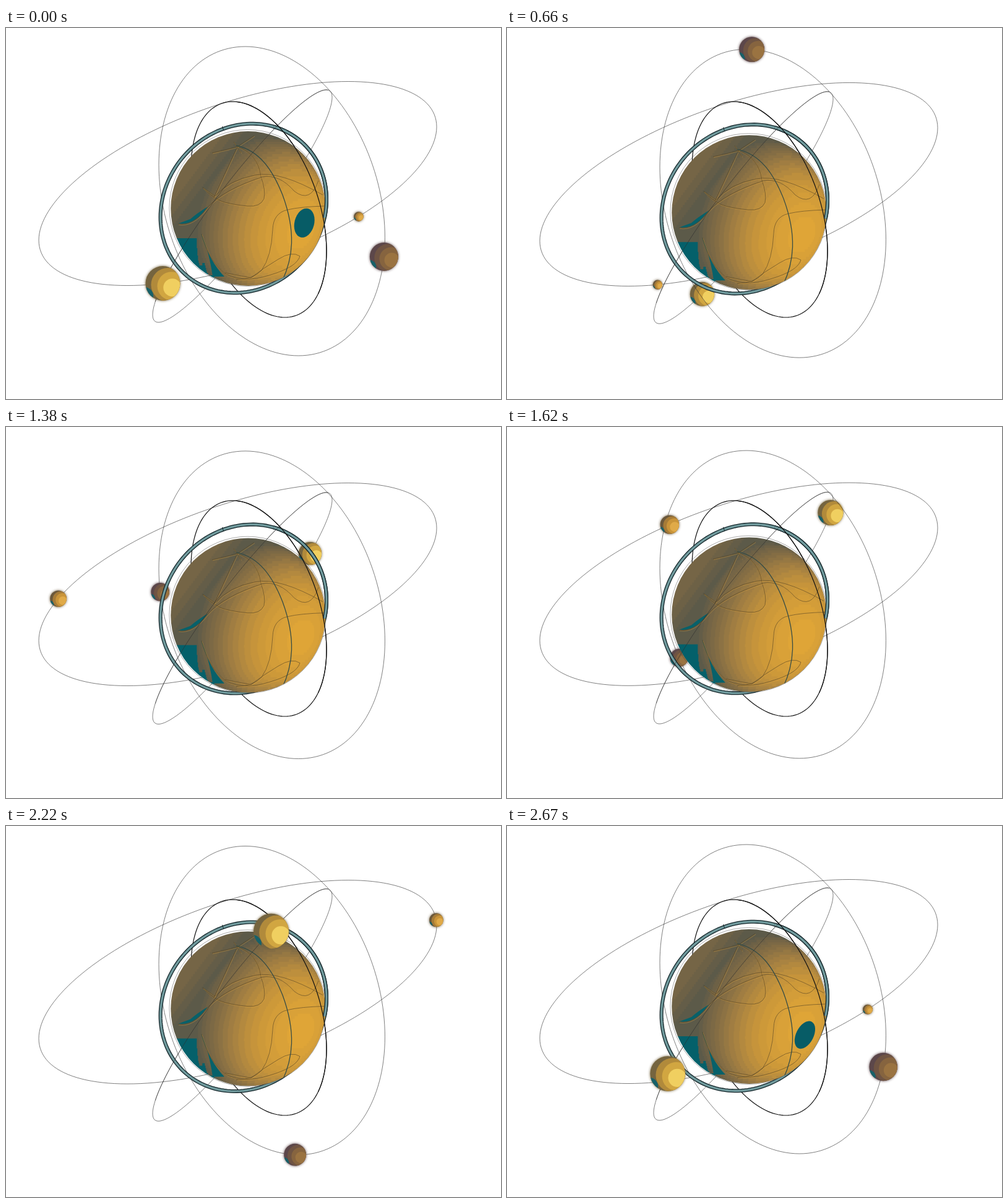
An HTML page with a canvas that plays this animation: 800x600 px, repeating every 2700 ms.

```html
<!DOCTYPE html>
<html lang="en">
<head>
<meta charset="utf-8">
<title>Planet with three moons</title>
<style>
  html, body { margin: 0; width: 100%; height: 100%; overflow: hidden; background: #fff; }
  canvas { display: block; width: 800px; height: 600px; }
</style>
</head>
<body>
<canvas id="stage" width="800" height="600"></canvas>
<script>
const ctx = document.getElementById('stage').getContext('2d');
const LOOP = 2700, STEP = 30, TAU = Math.PI * 2, RAD = Math.PI / 180;
const PLANET = { x: 391.3, y: 292, r: 125 };
const clamp = (v, lo, hi) => Math.min(hi, Math.max(lo, v));

// Ellipses by half extents; c is the slant, dy and dh follow the bob
const ORBITS = {
  wide:  { x: 374.5, y: 251.5, w: 321.5, h: 165,   c: -0.555, dy: 3,   dh: -1 },
  tall:  { x: 429.7, y: 280,   w: 182.7, h: 250,   c: 0.235,  dy: 7.7, dh: -1.2 },
  thin:  { x: 382,   y: 288,   w: 145,   h: 188,   c: -0.935, dy: 5.2, dh: -0.7 },
  dark:  { x: 408.5, y: 293.5, w: 109.5, h: 174.5, c: 0.385,  dy: 0,   dh: 0 },
  band:  { x: 383.8, y: 291.5, w: 134.2, h: 136.8, c: -0.105, dy: 2.6, dh: -0.3 }
};

// Perspective motion: k is the speed-up at the near point, reached at time `near`
const MOONS = {
  gold:   { orbit: 'wide', dir: 1,  near: 1700, start: 265.3,  k: 1.47, r: 9.7,
            tones: ['#6b583b', '#a67b37', '#c99439', '#e0aa48'] },
  brown:  { orbit: 'tall', dir: -1, near: 205,  start: -27.1,  k: 1.28, r: 18,
            tones: ['#5c474a', '#6f5443', '#86643f', '#9a7341'] },
  yellow: { orbit: 'thin', dir: -1, near: 2440, start: -108.6, k: 1.29, r: 22.2,
            tones: ['#75643f', '#b18a3b', '#d1a641', '#f0cf60'] }
};

function pointOn(o, a, bob) {
  const s = Math.sqrt(1 - o.c * o.c);
  return [o.x + o.w * Math.cos(a),
          o.y + o.dy * bob + (o.h + o.dh * bob) * (o.c * Math.cos(a) + s * Math.sin(a))];
}

function arc(o, bob, color, width, from = 0, to = TAU) {
  ctx.beginPath();
  for (let i = 0; i <= 160; i++) ctx.lineTo(...pointOn(o, from + (to - from) * i / 160, bob));
  ctx.strokeStyle = color;
  ctx.lineWidth = width;
  ctx.stroke();
}

function disc(x, y, r, color) {
  ctx.beginPath();
  ctx.arc(x, y, r, 0, TAU);
  ctx.fillStyle = color;
  ctx.fill();
}

function placeMoon(m, t, bob) {
  const phase = m.dir * TAU * (t - m.near) / LOOP;
  const a = m.start * RAD + 2 * Math.atan(m.k * Math.tan(phase / 2));
  const e = (m.k * m.k - 1) / (m.k * m.k + 1);
  const depth = Math.cos(phase);
  const [x, y] = pointOn(ORBITS[m.orbit], a, bob);
  return { x, y, r: m.r / (1 - e * depth), front: depth > 0.2, tones: m.tones };
}

function drawMoon({ x, y, r, tones }) {
  ctx.save();
  ctx.shadowColor = tones[0];
  ctx.shadowBlur = 4;
  disc(x, y, r, tones[0]);
  ctx.restore();
  ctx.save();
  ctx.beginPath();
  ctx.arc(x, y, r, 0, TAU);
  ctx.clip();
  disc(x - r * 1.05, y + r * 0.72, r * 0.5, '#176169');
  disc(x + r * 0.3, y + r * 0.08, r * 0.98, tones[1]);
  disc(x + r * 0.5, y + r * 0.15, r * 0.82, tones[2]);
  disc(x + r * 0.55, y + r * 0.24, r * 0.52, tones[3]);
  ctx.restore();
}

// Colour ramp from shadow to light
const RAMP = [[0, 84, 86, 74], [0.2, 112, 98, 70], [0.4, 138, 113, 68],
              [0.58, 168, 130, 65], [0.78, 201, 150, 58], [1, 223, 165, 55]];
function tone(b) {
  const i = clamp(RAMP.findIndex(s => s[0] >= b), 1, RAMP.length - 1);
  const lo = RAMP[i - 1], hi = RAMP[i], f = (b - lo[0]) / (hi[0] - lo[0]);
  return [1, 2, 3].map(n => lo[n] + (hi[n] - lo[n]) * f);
}

// Stepped light on the sphere, with a folded panel at the upper left
function makePlanet() {
  const size = 260, half = size / 2, R = PLANET.r;
  const cv = document.createElement('canvas');
  cv.width = cv.height = size;
  const g = cv.getContext('2d'), img = g.createImageData(size, size);
  for (let j = 0; j < size; j++) {
    for (let i = 0; i < size; i++) {
      const x = i - half, y = Math.floor((j - half) / 4) * 4;
      const u = x / R, v = y / R, z = Math.sqrt(Math.max(0, 1 - u * u - v * v));
      const fold = -0.8 * (x + 16) - 0.6 * (y + 102);
      const lit = 0.70 * u + 0.28 * v + 0.66 * z;
      let b = fold > 0 ? 0.05 + 0.2 * clamp(fold / 40, 0, 1) : Math.max(lit, 0.04);
      b = Math.round(clamp(b, 0, 1) * 17) / 17;
      const teal = fold < 0 && v > 0.36 && lit < 0.02 + 0.07 * Math.sin(x * 0.42);
      img.data.set([...(teal ? [4, 96, 106] : tone(b)), 255], (j * size + i) * 4);
    }
  }
  g.putImageData(img, 0, 0);
  return cv;
}
const planet = makePlanet();

const SEAMS = [
  'M333 202Q356 197 374 192Q408 205 412 240Q420 262 417 276Q411 290 390 288Q360 285 345 279Q330 272 318 258',
  'M318 258L338 272Q360 246 402 238Q442 230 512 270',
  'M278 317Q302 321 325 291Q350 262 414 241Q442 236 466 264Q492 284 505 247',
  'M514 288Q476 289 455 294Q432 299 431 326Q429 370 413 392Q399 407 372 407',
  'M316 333Q328 377 355 398Q384 413 425 400Q470 387 475 369Q462 360 440 374Q416 388 396 404L354 396',
  'M368 184L380 202M374 192L401 174M336 274L373 194'
].map(d => new Path2D(d));
const MERIDIAN = new Path2D('M372 190C410 198 431 230 447 270C469 330 464 372 446 410');
const SLASHES = new Path2D('M279 316Q304 320 326 289Q308 300 298 309ZM315 332Q329 378 353 402L334 402Q328 360 315 332Z');

function stroke(path, color, width) {
  ctx.strokeStyle = color;
  ctx.lineWidth = width;
  ctx.stroke(path);
}

// Brown moon's shadow, running along a great circle and foreshortened at the rim
function drawShade(t) {
  const turn = TAU * (t + 8) / LOOP, q = 2.7 * Math.sin(turn);
  if (Math.abs(q) >= 1 || Math.cos(turn) < 0) return;
  const a = -Math.asin(q);
  const x = 91 * Math.cos(a), y = 125 * (0.235 * Math.cos(a) + 0.972 * Math.sin(a));
  const flat = Math.sqrt(Math.max(0.01, 1 - (x * x + y * y) / PLANET.r ** 2));
  ctx.beginPath();
  ctx.ellipse(PLANET.x + x, PLANET.y + y, 24 * flat, 24, Math.atan2(y, x), 0, TAU);
  ctx.fillStyle = '#075c66';
  ctx.fill();
}

function drawPlanet(t, lift) {
  ctx.save();
  ctx.translate(0, lift);
  ctx.save();
  ctx.beginPath();
  ctx.arc(PLANET.x, PLANET.y, PLANET.r, 0, TAU);
  ctx.clip();
  ctx.drawImage(planet, PLANET.x - 130, PLANET.y - 130);
  ctx.fillStyle = '#07616a';
  ctx.fill(SLASHES);
  for (const s of SEAMS) {
    ctx.save();
    ctx.translate(1, 1.2);
    stroke(s, 'rgba(218,160,64,.4)', 1);
    ctx.restore();
    stroke(s, 'rgba(84,68,36,.6)', 1);
  }
  stroke(MERIDIAN, '#364c45', 1.3);
  drawShade(t);
  ctx.restore();
  ctx.beginPath();
  ctx.arc(390.5, 291, 126.6, 0, TAU);
  ctx.strokeStyle = 'rgba(60,60,60,.55)';
  ctx.lineWidth = 0.8;
  ctx.stroke();
  ctx.restore();
}

function drawBand(bob, from, to) {
  arc(ORBITS.band, bob, '#14262a', 6, from, to);
  arc(ORBITS.band, bob, '#719b9e', 3.4, from, to);
}

function draw(time) {
  const t = Math.floor(time % LOOP / STEP) * STEP;
  const bob = (1 - Math.cos(TAU * t / LOOP)) / 2;
  const gold = placeMoon(MOONS.gold, t, bob);
  const brown = placeMoon(MOONS.brown, t, bob);
  const yellow = placeMoon(MOONS.yellow, t, bob);
  const grey = 'rgba(45,45,45,.68)';

  ctx.fillStyle = '#fff';
  ctx.fillRect(0, 0, 800, 600);
  arc(ORBITS.wide, bob, grey, 0.9);
  arc(ORBITS.thin, bob, grey, 0.9);
  arc(ORBITS.dark, bob, '#111', 1.2);
  if (!yellow.front) drawMoon(yellow);
  if (!gold.front) drawMoon(gold);
  arc(ORBITS.tall, bob, grey, 0.9);
  if (!brown.front) drawMoon(brown);

  drawBand(bob);
  ctx.beginPath();
  ctx.moveTo(349.5, 159 + 3 * bob);
  ctx.lineTo(351.5, 165 + 3 * bob);
  ctx.strokeStyle = '#14262a';
  ctx.lineWidth = 1;
  ctx.stroke();
  drawPlanet(t, 12.7 * bob);

  drawBand(bob, -1.2, 0.22);
  arc(ORBITS.thin, bob, grey, 0.9, -2.9, -0.3);
  arc(ORBITS.dark, bob, '#111', 1.2, -1.9, 0.5);
  for (const m of [gold, brown, yellow]) if (m.front) drawMoon(m);
}

let began;
function tick(now) {
  began ??= now;
  draw(now - began);
  requestAnimationFrame(tick);
}
draw(0);
requestAnimationFrame(tick);
</script>
</body>
</html>
```
